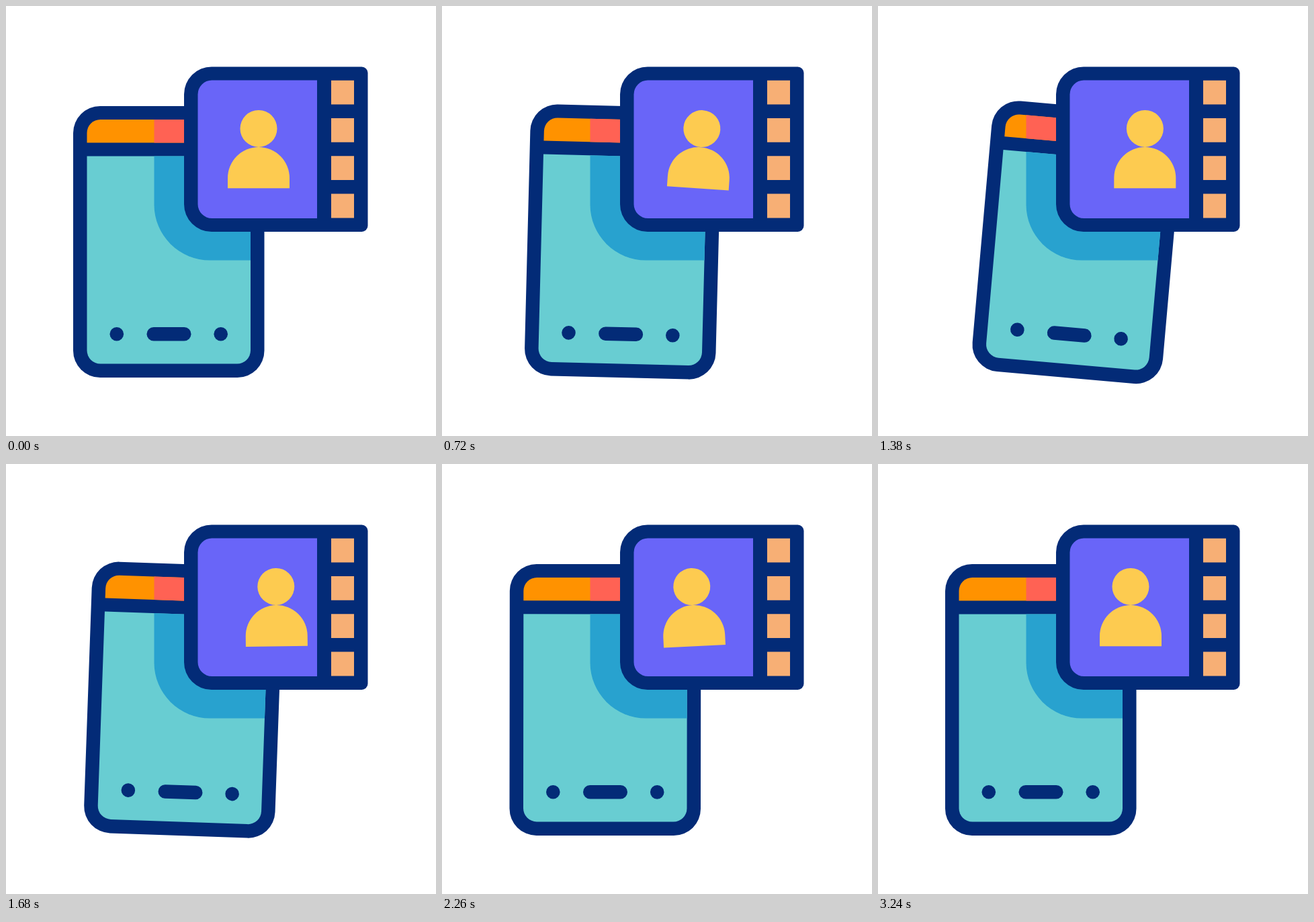
Write an HTML page with a canvas that moves like this. It is 640 by 640 pixels and loops after 3.6 s.

```html
<!DOCTYPE html>
<html lang="en">
<head>
<meta charset="utf-8">
<title>Phone and contact card</title>
<style>
  html, body { margin: 0; height: 100%; overflow: hidden; background: #fff; }
  canvas { display: block; }
</style>
</head>
<body>
<canvas id="stage" width="640" height="640"></canvas>
<script>
const LOOP = 3600;
const NAVY = '#032b77', PURPLE = '#6965f8', PEACH = '#f7af75', YELLOW = '#fdcb50';
const TEAL = '#68cdd2', BLUE = '#28a2cf', ORANGE = '#ff9200', RED = '#ff6254';

const ctx = document.getElementById('stage').getContext('2d');

// cubic-bezier(.25, .1, .25, 1)
function ease(x) {
  const curve = (a, b, s) => 3 * a * s * (1 - s) ** 2 + 3 * b * s * s * (1 - s) + s ** 3;
  let low = 0, high = 1;
  for (let i = 0; i < 24; i++) {
    const mid = (low + high) / 2;
    if (curve(0.25, 0.25, mid) < x) low = mid; else high = mid;
  }
  return curve(0.1, 1, low);
}

const progress = (time, from, to) => Math.min(1, Math.max(0, (time - from) / (to - from)));
const mix = (a, b, k) => a + (b - a) * k;

// Rises from 0 to 1 and falls back
const swell = (time, from, to) => Math.sin(Math.PI * progress(time, from, to)) ** 2;

// Leans left, swings over to the right, then settles
function phonePose(time) {
  const windUp = ease(progress(time, 160, 465));
  const swing = ease(progress(time, 465, 1215));
  const settle = 1 - ease(progress(time, 1215, 2420));
  return {
    shift: mix(-8.6 * windUp, 43.5, swing) * settle,
    tilt: mix(-5 * windUp, 6, swing) * settle
  };
}

// Two hops to the right while rocking once each way
function personPose(time) {
  return {
    shift: 6.2 * swell(time, 180, 1000) + 29 * swell(time, 1000, 2160),
    tilt: 4.1 * swell(time, 180, 1430) - 2.75 * swell(time, 1350, 3240)
  };
}

function box(x, y, w, h, radii, color) {
  ctx.beginPath();
  ctx.roundRect(x, y, w, h, radii);
  ctx.fillStyle = color;
  ctx.fill();
}

function disc(x, y, r, color) {
  ctx.beginPath();
  ctx.arc(x, y, r, 0, Math.PI * 2);
  ctx.fillStyle = color;
  ctx.fill();
}

// Rotates about the foot of the figure at (x, y)
function posed(x, y, { shift, tilt }, draw) {
  ctx.save();
  ctx.translate(x + shift, y);
  ctx.rotate(tilt * Math.PI / 180);
  ctx.translate(-x, -y);
  draw();
  ctx.restore();
}

// The card's shadow stays still while the panel under it moves
function panel(y, h, radii, color, shade) {
  ctx.save();
  box(120.5, y, 243.5, h, radii, color);
  ctx.clip();
  ctx.resetTransform();
  box(220.5, 0, 420, 378.5, [0, 0, 0, 83], shade);
  ctx.restore();
}

function drawPhone() {
  box(100, 149, 284.5, 404, 40, NAVY);
  panel(169, 34.5, [20, 20, 0, 0], ORANGE, RED);
  panel(223.5, 309, [0, 0, 20, 20], TEAL, BLUE);
  disc(164.8, 488.3, 10.3, NAVY);
  disc(319.7, 488.3, 10.3, NAVY);
  box(209.5, 478, 66, 20.5, 10.25, NAVY);
}

function drawCard() {
  box(265, 90.5, 273.5, 245.5, [41, 9, 9, 41], NAVY);
  box(285.5, 110.5, 177.5, 205.5, [21, 0, 0, 21], PURPLE);
  for (let i = 0; i < 4; i++) box(484, 110.7 + i * 56.3, 34, 35.8, 0, PEACH);
}

function drawPerson() {
  disc(376, 182.4, 27.5, YELLOW);
  box(330, 210, 92, 61.3, [46, 46, 0, 0], YELLOW);
}

function render(elapsed) {
  const time = elapsed % LOOP;
  ctx.fillStyle = '#fff';
  ctx.fillRect(0, 0, 640, 640);
  posed(242.2, 553, phonePose(time), drawPhone);
  drawCard();
  posed(376, 271, personPose(time), drawPerson);
}

let start;
function tick(now) {
  start ??= now;
  render(now - start);
  requestAnimationFrame(tick);
}
render(0);
requestAnimationFrame(tick);
</script>
</body>
</html>
```
